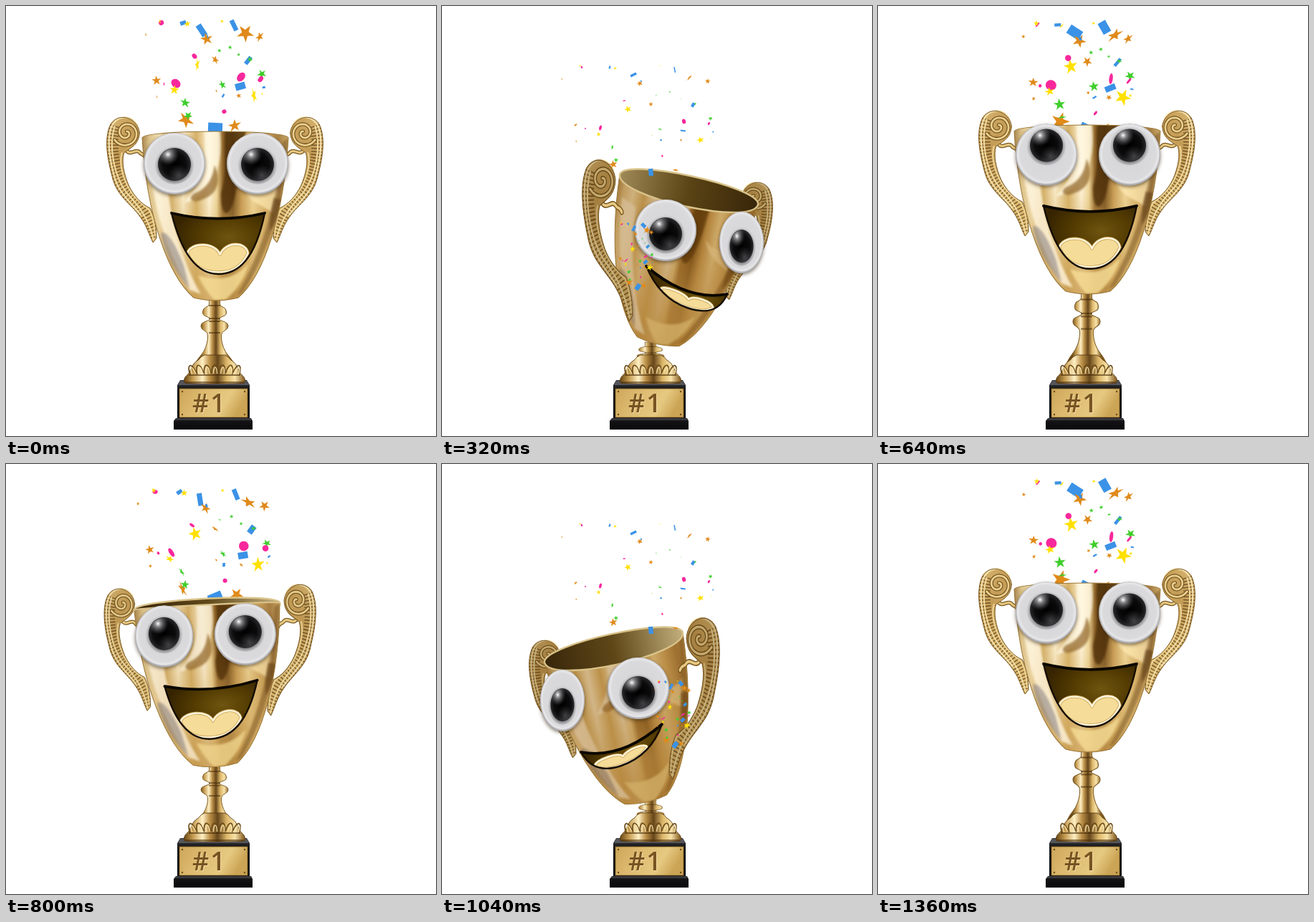
Animation of 600x600 px, one loop 1440 ms. Source, as an HTML page with a canvas:

```html
<!DOCTYPE html>
<html lang="en">
<head>
<meta charset="utf-8">
<title>Happy trophy</title>
<style>
  html, body { margin: 0; width: 100%; height: 100%; overflow: hidden; background: #fff; }
  svg, canvas { position: absolute; left: 0; top: 0; width: 600px; height: 600px; }
  text { font: 600 36px 'Open Sans', sans-serif; letter-spacing: 2px; }
</style>
</head>
<body>
<svg viewBox="0 0 600 600">
  <defs>
    <linearGradient id="plate" x2="1" y2=".25">
      <stop offset="0" stop-color="#cda659"/><stop offset=".35" stop-color="#dcb96e"/>
      <stop offset=".75" stop-color="#e6c981"/><stop offset="1" stop-color="#cba455"/>
    </linearGradient>
    <linearGradient id="wood" x2="0" y2="1">
      <stop offset="0" stop-color="#3a3a3e"/><stop offset=".25" stop-color="#141416"/>
      <stop offset="1" stop-color="#08080a"/>
    </linearGradient>
  </defs>
  <path d="M243 522H336L340 529V577H239V529Z" fill="url(#wood)"/>
  <path d="M243 523H336L339 529H240Z" fill="#55565c"/>
  <path d="M237 575H342L344 579V591H234V579Z" fill="url(#wood)"/>
  <path d="M236 577H342" stroke="#4b4b50"/>
  <rect x="242" y="534" width="95" height="40" fill="url(#plate)" stroke="#7d5c20" stroke-width=".8"/>
  <g fill="#6b4b16">
    <circle cx="246" cy="538" r="1.2"/><circle cx="333" cy="538" r="1.2"/>
    <circle cx="246" cy="570" r="1.2"/><circle cx="333" cy="570" r="1.2"/>
  </g>
  <text x="261" y="568" fill="#f3dca2">#1</text>
  <text x="260" y="567" fill="#775322">#1</text>
</svg>
<canvas id="stage" width="600" height="600"></canvas>
<script>
const ctx = document.getElementById('stage').getContext('2d');
const TAU = Math.PI * 2, STEP = 80, HALF = 9, MID = 294;

const mix = (a, b, k) => a + (b - a) * k;

// value of a [time, value] table at t
function at(table, t) {
  if (t <= table[0][0]) return table[0][1];
  for (let i = 1; i < table.length; i++) {
    const [t0, v0] = table[i - 1], [t1, v1] = table[i];
    if (t <= t1) return mix(v0, v1, (t - t0) / (t1 - t0));
  }
  return table[table.length - 1][1];
}

function addStops(g, stops) {
  stops.forEach(([o, c]) => g.addColorStop(o, c));
  return g;
}
const gradient = (x0, y0, x1, y1, stops) => addStops(ctx.createLinearGradient(x0, y0, x1, y1), stops);
const radial = (x, y, r, stops) => addStops(ctx.createRadialGradient(x, y, 0, x, y, r), stops);

function random(seed) {
  return () => (seed = (seed * 16807) % 2147483647) / 2147483647;
}

// --- pose -----------------------------------------------------------

// joints upright, half leaned and fully leaned to the right
const JOINTS = {
  rimL:   [190, 184, 220, 208, 248, 235],
  rimR:   [394, 184, 422, 233, 441, 277],
  foot:   [293, 411, 295, 440, 301, 472],
  eyeL:   [235, 220, 278, 264, 312, 313],
  eyeR:   [351, 220, 387, 271, 418, 330],
  mouthL: [231, 289, 257, 321, 285, 363],
  mouthR: [361, 289, 385, 342, 398, 402],
  chin:   [296, 374, 320, 398, 342, 421],
  topL:   [140, 153, 165, 185, 195, 212],
  tipL:   [211, 330, 231, 382, 267, 440],
  topR:   [443, 153, 452, 200, 462, 244],
  tipR:   [372, 330, 393, 366, 395, 410]
};
const LEAN = [0, .2, .5, .82, 1, .55, 0, 0, 0];
const LIFT = [0, 0, 0, 0, 0, -16, -28, -18, -9];
const BOUNCE = { eyeL: 1.4, eyeR: 1.4, mouthL: 1.12, mouthR: 1.12, chin: .8 };
const LOOK = [[0, 0], [4, 4], [8, -14], [11, 0], [13, 5], [15, -7], [17, -5], [18, 0]];
const swapSide = name => name.replace(/[LR]$/, s => s === 'L' ? 'R' : 'L');

function poseAt(index) {
  const phase = index % HALF, right = index < HALF;
  const lean = LEAN[phase];
  const pose = { lean, right, look: at(LOOK, index) };
  for (const name in JOINTS) {
    const rest = JOINTS[name], j = JOINTS[right ? name : swapSide(name)];
    const shift = n => at([[0, 0], [.5, j[n + 2] - j[n]], [1, j[n + 4] - j[n]]], lean);
    pose[name] = {
      x: rest[0] + shift(0) * (right ? 1 : -1),
      y: rest[1] + shift(1) + LIFT[phase] * (BOUNCE[name] || 1)
    };
  }
  return pose;
}

// --- trophy ---------------------------------------------------------

const GOLD = [[0, '#6b4a18'], [.14, '#c49a50'], [.3, '#fff0c4'], [.42, '#bd9148'],
  [.55, '#66461a'], [.7, '#dcb76a'], [.84, '#f8e2a8'], [1, '#80591f']];
const STEM = [[8, -120], [7, -109], [9, -106], [16, -103], [17, -94], [9, -91], [5, -88], [12, -85],
  [19, -82], [19, -75], [12, -71], [9, -67], [10, -55], [15, -42], [24, -32], [30, -20]];
const DOME = [[14, -38], [20, -35], [21, -32], [29, -27], [35, -15], [36, -12], [42, -7], [43, 0], [40, 2]];

// symmetric turned shape from half widths, rounded between points
function turned(profile) {
  const pts = [...profile.map(([w, y]) => [-w, y]), ...[...profile].reverse()];
  ctx.beginPath();
  ctx.moveTo(...pts[0]);
  for (let i = 1; i < pts.length - 1; i++) {
    const [x, y] = pts[i], [nx, ny] = pts[i + 1];
    ctx.quadraticCurveTo(x, y, (x + nx) / 2, (y + ny) / 2);
  }
  ctx.lineTo(...pts[pts.length - 1]);
  ctx.closePath();
}

function drawStem(pose) {
  ctx.save();
  ctx.translate(291, 525);
  ctx.lineJoin = 'round';
  ctx.save();
  ctx.scale(1, (525 - pose.foot.y) / 114);
  turned(STEM);
  ctx.fillStyle = gradient(-20, 0, 20, 0, GOLD);
  ctx.fill();
  ctx.lineWidth = 1;
  ctx.strokeStyle = '#7a5821';
  ctx.stroke();
  ctx.fillStyle = 'rgba(60,35,5,.55)';
  [-108, -90, -86, -70].forEach(y => ctx.fillRect(-8, y, 16, 2));
  ctx.restore();

  turned(DOME);
  ctx.fillStyle = gradient(-42, 0, 42, 0, GOLD);
  ctx.fill();
  ctx.strokeStyle = 'rgba(80,50,10,.8)';
  ctx.lineWidth = 1;
  ctx.stroke();
  for (let i = -3; i <= 3; i++) {
    ctx.beginPath();
    ctx.ellipse(i * 10, -12, 4.5, 12, i * .12, Math.PI, TAU);
    ctx.strokeStyle = '#6b4a18';
    ctx.lineWidth = 1.6;
    ctx.stroke();
    ctx.beginPath();
    ctx.ellipse(i * 10 + 1, -12, 2.5, 9, i * .12, Math.PI, TAU);
    ctx.strokeStyle = '#f7e4ac';
    ctx.lineWidth = 1.2;
    ctx.stroke();
  }
  ctx.fillStyle = 'rgba(70,42,8,.6)';
  ctx.fillRect(-36, -11, 72, 2);
  ctx.fillRect(-41, -1, 82, 2);
  ctx.restore();
}

const HANDLE = new Path2D('M47 24C45 3 18 -6 6 12C-4 32 2 62 8 84C14 112 34 122 47 140' +
  'C58 154 60 166 66 177L71 171C71 150 67 140 62 129C50 124 39 112 32 98C25 82 21 64 25 52C32 46 46 42 47 24Z');
const SPINE = new Path2D('M12 14C2 45 12 86 29 108C44 124 59 140 67 174');
const EDGE = new Path2D('M44 13C34 -3 14 0 7 16C0 36 5 62 11 84C17 108 36 122 49 139');
const INNER = new Path2D('M22 52C18 66 23 84 30 98C38 114 50 123 60 131C66 140 68 152 69 168');
const ARM = new Path2D('M27 47C34 58 41 45 47 51C50 56 53 52 56 59');
const SCROLL = new Path2D();
for (let i = 0; i <= 40; i++) {
  const a = 2.6 - i / 40 * TAU * 1.6, r = 19 - i * .42;
  SCROLL.lineTo(28 + r * Math.cos(a), 24 + r * Math.sin(a));
}

function drawHandle(top, tip, lean) {
  const line = (path, width, color) => {
    ctx.lineWidth = width;
    ctx.strokeStyle = color;
    ctx.stroke(path);
  };
  ctx.save();
  ctx.translate(top.x, top.y);
  ctx.scale((tip.x - top.x) / 72, (tip.y - top.y) / 177);
  ctx.lineCap = 'round';
  line(ARM, 5.5, '#7a5821');
  line(ARM, 3, '#e6c982');
  ctx.fillStyle = gradient(0, 0, 72, 40, [[0, '#dcbb76'], [.5, '#c49c56'], [1, '#dcb970']]);
  ctx.fill(HANDLE);
  ctx.save();
  ctx.clip(HANDLE);
  ctx.lineCap = 'butt';
  ctx.setLineDash([1.5, 3]);
  line(SPINE, 18, 'rgba(80,54,16,.7)');
  ctx.setLineDash([]);
  line(SPINE, 2, '#f3dda4');
  ctx.restore();
  line(SCROLL, 5, '#6b4c1c');
  line(SCROLL, 2.8, '#ecd08c');
  line(EDGE, 2, '#f6e3b0');
  line(INNER, 2, '#efd596');
  line(HANDLE, 1, '#7b5a24');
  if (lean) {
    ctx.fillStyle = `rgba(70,40,0,${lean * .25})`;
    ctx.fill(HANDLE);
  }
  ctx.restore();
}

const SIDES = 'C388 290 361 375 324 407Q293 415 262 407C225 375 196 290 190 184Z';
const METAL = [[0, '#a8854f'], [.05, '#dcc28a'], [.12, '#f3e2b8'], [.2, '#d3b06a'], [.28, '#f9ebc8'],
  [.37, '#d6b168'], [.46, '#fff4d8'], [.51, '#eed69a'], [.55, '#94692e'], [.62, '#76501e'],
  [.68, '#c79c54'], [.76, '#f0d79a'], [.84, '#d3ad66'], [.93, '#a88045'], [1, '#ccaa6a']];
const SHINE = [
  ['M200 215C208 300 230 350 256 396L272 402C242 350 228 290 222 225Z', 'rgba(255,246,222,.8)'],
  ['M216 318C222 310 236 330 248 362L256 394C240 376 222 350 216 318Z', 'rgba(150,142,140,.65)'],
  ['M306 170L338 170C322 200 328 235 320 262C314 296 300 300 300 262C310 228 302 200 306 170Z', 'rgba(78,48,10,.8)'],
  ['M276 172L298 172C302 205 298 222 290 240C278 262 262 274 248 274C270 250 282 226 276 172Z', 'rgba(255,248,228,.75)'],
  ['M291 222C300 240 298 262 274 270C262 276 252 270 262 262C278 256 288 244 291 222Z', 'rgba(150,108,50,.75)'],
  ['M330 248C342 266 366 262 382 246L374 290C356 276 338 276 330 248Z', 'rgba(255,234,180,.7)'],
  ['M386 190L394 184C388 270 366 350 330 400L322 404C358 340 380 270 386 190Z', 'rgba(130,94,44,.6)'],
  ['M374 268L386 270C382 290 376 304 368 314C368 296 370 284 374 268Z', 'rgba(100,66,26,.65)'],
  ['M268 376C292 384 318 382 338 360C330 388 318 400 306 410L290 410C282 400 274 390 268 376Z', 'rgba(247,222,150,.8)']
].map(([d, color]) => [new Path2D(d), color]);

function drawCup({ rimL, rimR, foot, lean, right }) {
  const ux = (rimR.x - rimL.x) / 204, uy = (rimR.y - rimL.y) / 204;
  const vx = (foot.x - mix(rimL.x, rimR.x, .505)) / 227;
  const vy = (foot.y - mix(rimL.y, rimR.y, .505)) / 227;
  const back = 184 - mix(12, 26, lean), front = 184 + mix(-12, 33, lean);
  const body = new Path2D(`M190 184C192 ${front} 392 ${front} 394 184${SIDES}`);
  const mouth = new Path2D(`M190 184C192 ${back} 392 ${back} 394 184C392 ${front} 192 ${front} 190 184Z`);

  ctx.save();
  ctx.transform(ux, uy, vx, vy, rimL.x - ux * 190 - vx * 184, rimL.y - uy * 190 - vy * 184);
  if (lean) {
    const stops = right ? ['#a08a58', '#5a4314', '#38260a'] : ['#38260a', '#5f4718', '#c2ae7c'];
    ctx.fillStyle = gradient(190, 0, 394, 0, stops.map((c, i) => [i / 2, c]));
    ctx.fill(mouth);
  }
  ctx.fillStyle = gradient(190, 0, 394, 0, METAL);
  ctx.fill(body);
  ctx.save();
  ctx.clip(body);
  ctx.fillStyle = gradient(0, 260, 0, 411, [[0, 'rgba(212,172,98,0)'], [.6, 'rgba(212,172,98,.65)'], [1, 'rgba(200,155,78,.8)']]);
  ctx.fillRect(180, 160, 230, 260);
  ctx.filter = 'blur(1.5px)';
  SHINE.forEach(([path, color]) => {
    ctx.fillStyle = color;
    ctx.fill(path);
  });
  ctx.filter = 'none';
  ctx.fillStyle = `rgba(135,80,10,${lean * .34})`;
  ctx.fillRect(180, 160, 230, 260);
  ctx.restore();
  ctx.lineWidth = 1;
  ctx.strokeStyle = '#9a7637';
  ctx.stroke(body);
  if (lean) {
    ctx.lineWidth = 2.5;
    ctx.strokeStyle = '#d9c38a';
    ctx.stroke(mouth);
  }
  ctx.restore();
}

// --- face -----------------------------------------------------------

function drawEye(p, rx, look) {
  const disc = r => {
    ctx.beginPath();
    ctx.arc(0, 0, r, 0, TAU);
    ctx.fill();
  };
  ctx.save();
  ctx.translate(p.x, p.y);
  ctx.scale(rx / 43, 1);
  ctx.save();
  ctx.shadowColor = 'rgba(60,40,15,.6)';
  ctx.shadowBlur = 5;
  ctx.shadowOffsetY = 2;
  ctx.fillStyle = '#c6c6c8';
  disc(43);
  ctx.restore();
  ctx.fillStyle = radial(0, -1, 43, [[0, '#d4d4d6'], [.85, '#dadadc'], [.94, '#e8e8ea'], [1, '#a6a6aa']]);
  disc(43);
  ctx.translate(0, look + 1);
  ctx.fillStyle = radial(0, 2, 28, [[.75, 'rgba(60,60,65,.6)'], [1, 'rgba(120,120,125,0)']]);
  disc(28);
  ctx.fillStyle = radial(0, 0, 23, [[0, '#000'], [.7, '#0b0b0c'], [1, '#29292b']]);
  disc(23);
  ctx.fillStyle = radial(-9, -14, 15, [[0, 'rgba(255,255,255,1)'], [.3, 'rgba(215,215,220,.6)'], [1, 'rgba(120,120,125,0)']]);
  disc(22.5);
  ctx.fillStyle = radial(6, 15, 15, [[0, 'rgba(120,120,125,.5)'], [1, 'rgba(80,80,85,0)']]);
  disc(22.5);
  ctx.restore();
}

const TONGUE = new Path2D('M.17 .66C.2 .48 .46 .46 .52 .68C.58 .46 .8 .46 .82 .66C.74 .92 .62 .97 .5 .97C.36 .97 .24 .9 .17 .66Z');

function drawMouth({ mouthL, mouthR, chin, lean }) {
  const ux = mouthR.x - mouthL.x, uy = mouthR.y - mouthL.y;
  const vx = chin.x - mix(mouthL.x, mouthR.x, .5), vy = chin.y - mix(mouthL.y, mouthR.y, .5);
  const dip = .18 + .6 * lean ** 2;
  const jaw = new Path2D(`M0 0Q.5 ${dip} 1 0C.9 .75 .72 1 .5 1C.3 1 .12 .75 0 0Z`);
  const lip = new Path2D(`M0 0Q.5 ${dip} 1 0`);
  // even line width under the skewed transform
  const stroke = (path, width, color) => {
    const flat = new Path2D();
    flat.addPath(path, ctx.getTransform());
    ctx.save();
    ctx.resetTransform();
    ctx.lineWidth = width;
    ctx.strokeStyle = color;
    ctx.stroke(flat);
    ctx.restore();
  };
  ctx.save();
  ctx.lineJoin = ctx.lineCap = 'round';
  ctx.transform(ux, uy, vx, vy, mouthL.x, mouthL.y);
  ctx.fillStyle = radial(.62, .4, .6, [[0, '#6f5510'], [.5, '#543c02'], [1, '#362400']]);
  ctx.fill(jaw);
  ctx.save();
  ctx.clip(jaw);
  ctx.fillStyle = '#f5dc98';
  ctx.fill(TONGUE);
  stroke(TONGUE, 4, '#caa257');
  stroke(TONGUE, 2.4, '#fff6dc');
  ctx.restore();
  stroke(jaw, 2.4, '#140c00');
  stroke(lip, 3.8, '#0a0600');
  ctx.restore();
}

// --- confetti -------------------------------------------------------

const COLORS = ['#e08a1a', '#3b92e6', '#3fce2c', '#f7289c', '#ffe000'];
const BLUE = 1, PINK = 3;
// x, y when fully spread, colour, radius
const PIECES = [
  [273, 34, 1, 9], [280, 46, 0, 8], [334, 38, 0, 11], [318, 27, 1, 8], [354, 43, 0, 7],
  [267, 82, 4, 9], [263, 70, 3, 4], [292, 75, 0, 6], [338, 76, 1, 6], [328, 99, 3, 7],
  [327, 112, 1, 7], [357, 95, 2, 6], [346, 125, 4, 10], [210, 104, 0, 6], [237, 108, 3, 7],
  [235, 117, 4, 6], [302, 110, 2, 6], [250, 135, 2, 7], [251, 159, 0, 11], [319, 167, 0, 9],
  [292, 170, 1, 10], [254, 153, 2, 6]
].map(([x, y, color, size]) => ({ x, y, color, size }));
const rnd = random(77);
for (let i = 0; i < 20; i++) {
  PIECES.push({ x: 195 + rnd() * 165, y: 20 + rnd() * 155, color: i % 5, size: 2 + rnd() * 2.5 });
}
PIECES.forEach(p => {
  p.turn = rnd() * TAU;
  p.flip = rnd() * 1.2 - .6;
  p.spin = .5 + rnd() * .7;
});

const RISE = [[0, 0], [1, .5], [2, .82], [3, .93], [4, .99], [5, 1]];
const SPREAD = [[0, .3], [2, .33], [3, .65], [4, .92], [5, 1], [7, 1.22], [13, 1.4]];
const FALL = [[5, 0], [7, 31], [9, 62], [11, 128], [13, 230]];
const SIZE = [[0, .45], [2, 1.4], [4, 1.08], [5, 1], [7, .95], [8, .75], [9, .5], [11, .36], [13, .15]];

function shape(color, r) {
  ctx.beginPath();
  if (color === BLUE) ctx.rect(-r, -r * .7, r * 2, r * 1.4);
  else if (color === PINK) ctx.arc(0, 0, r, 0, TAU);
  else for (let i = 0; i < 10; i++) {
    const a = i * TAU / 10, d = i % 2 ? r * .45 : r * 1.15;
    ctx.lineTo(d * Math.sin(a), -d * Math.cos(a));
  }
  ctx.fill();
}

function drawBurst(age, right) {
  const rise = at(RISE, age), spread = at(SPREAD, age), fall = at(FALL, age), size = at(SIZE, age);
  const side = (right ? -20 : 32) * (1 - rise);
  PIECES.forEach(p => {
    const x = MID + side + (p.x - MID) * spread;
    const y = mix(350 + (p.y - 100) * .6, p.y, rise) + fall;
    ctx.save();
    ctx.translate(x, y);
    ctx.rotate(p.turn + p.flip * (age - 5));
    ctx.scale(1, .25 + .75 * Math.abs(Math.cos(p.turn + p.spin * (age - 5))));
    ctx.fillStyle = COLORS[p.color];
    shape(p.color, p.size * size);
    ctx.restore();
  });
}

// --- loop -----------------------------------------------------------

function draw(index) {
  const pose = poseAt(index), { lean, right } = pose, phase = index % HALF;
  const bursts = [[phase + 5, !right], [phase - 4, right]].filter(([age]) => age >= 0 && age < 13);
  const inFront = age => age > 6 || age < 1;
  const handle = s => drawHandle(pose['top' + s], pose['tip' + s], lean);
  const near = right ? 'L' : 'R', far = right ? 'R' : 'L';
  const farEye = 43 - 12 * lean;

  ctx.clearRect(0, 0, 600, 600);
  bursts.forEach(([age, r]) => inFront(age) || drawBurst(age, r));
  drawStem(pose);
  handle(far);
  if (lean < .3) handle(near);
  drawCup(pose);
  if (lean >= .3) handle(near);
  drawMouth(pose);
  drawEye(pose['eye' + far], farEye, pose.look);
  drawEye(pose['eye' + near], 43, pose.look);
  bursts.forEach(([age, r]) => inFront(age) && drawBurst(age, r));
}

let start, last = -1;
function tick(now) {
  start ??= now;
  const index = Math.floor((now - start) / STEP) % (2 * HALF);
  if (index !== last) draw(last = index);
  requestAnimationFrame(tick);
}
draw(0);
requestAnimationFrame(tick);
</script>
</body>
</html>
```
